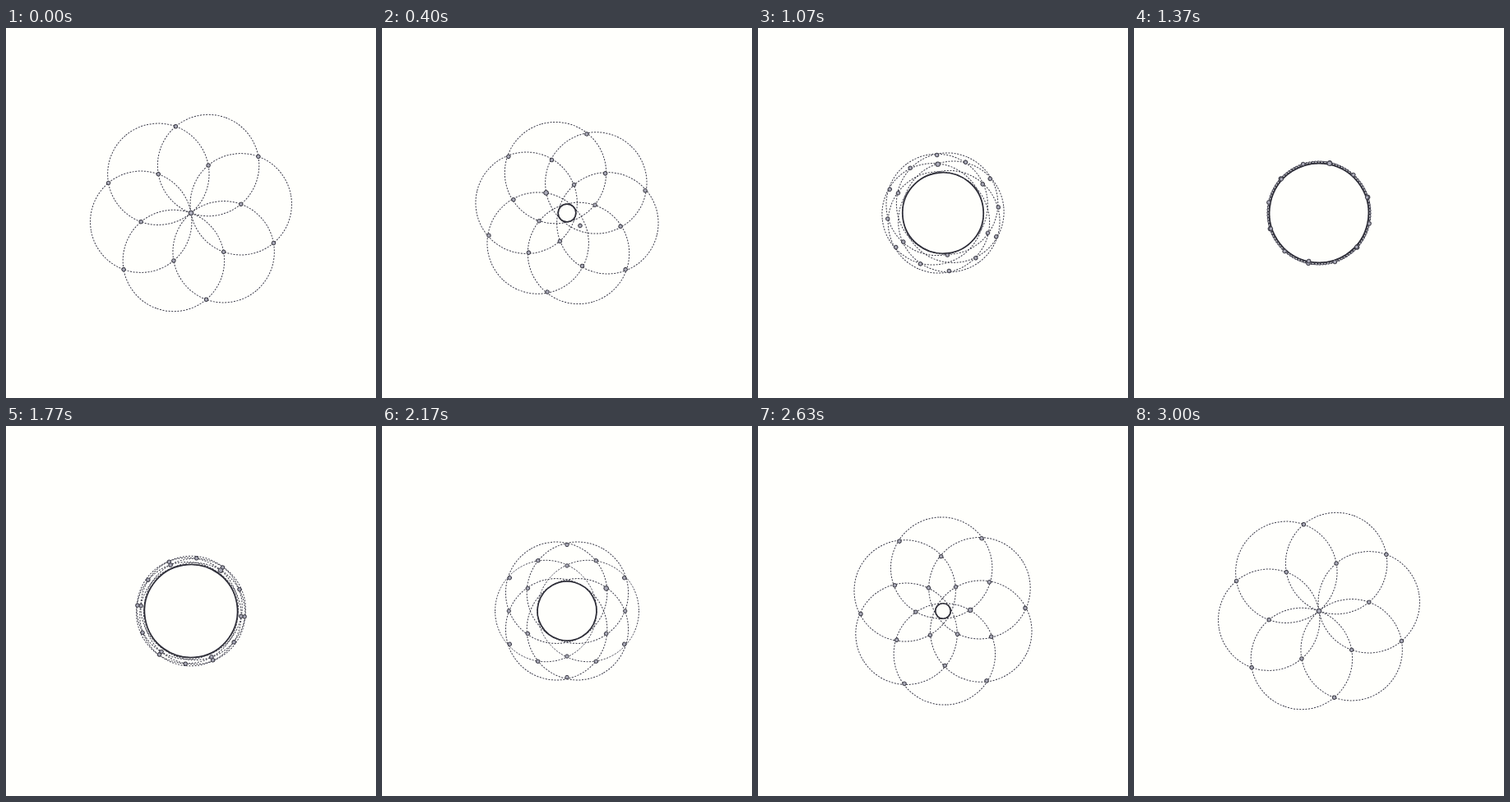
An HTML page for the animation above (3.03 s loop, 450 by 450 pixels).

```html
<!DOCTYPE html>
<html lang="en">
<head>
<meta charset="utf-8">
<title>Six circles</title>
<style>
  html, body { margin: 0; width: 100%; height: 100%; overflow: hidden; background: #fffffc; }
  svg { display: block; width: 100vw; height: 100vh; }
  .orbit { fill: none; stroke: #3c3c4a; stroke-width: 1; stroke-dasharray: 2 1.59; }
  .ring { fill: none; stroke: #2e2e38; stroke-width: 1.7; }
  .dot { fill: #aaaab8; stroke: #40404a; stroke-width: 1; }
</style>
</head>
<body>
<svg viewBox="0 0 450 450">
  <g id="stage"></g>
</svg>
<script>
  const R = 61.7;
  const LOOP = 3030, STEPS = 91;
  const stage = document.getElementById('stage');

  function circle(parent, cls, r) {
    const el = document.createElementNS('http://www.w3.org/2000/svg', 'circle');
    el.setAttribute('class', cls);
    el.setAttribute('r', r);
    parent.appendChild(el);
    return el;
  }

  function spoke(angle) {
    const g = document.createElementNS('http://www.w3.org/2000/svg', 'g');
    g.setAttribute('transform', `rotate(${angle})`);
    stage.appendChild(g);
    return g;
  }

  // Six copies of a circle, one on every 60 degree spoke
  function six(offset, cls, size) {
    return Array.from({ length: 6 }, (_, k) => circle(spoke(offset + k * 60), cls, size(k)));
  }

  const LEAD = 3, LAG = 0; // the larger inner dot and the late one opposite it
  const orbits = six(0, 'orbit', () => R);
  const ring = circle(stage, 'ring', 0);
  const outer = six(30, 'dot', () => 2.2);
  const middle = six(0, 'dot', () => 2.2);
  const inner = six(90, 'dot', k => k === LEAD ? 2.7 : 2.2);
  stage.appendChild(inner[LEAD].parentNode);

  const place = (list, x) => list.forEach(el => el.setAttribute('cx', x));
  const smooth = x => x * x * (3 - 2 * x);

  function draw(step) {
    const turn = step / (STEPS - 1);
    const away = Math.abs(1 - 2 * turn); // 1 when fully open, 0 when closed
    const open = smooth(away);
    const d = R * open;
    stage.setAttribute('transform', `translate(225 225) rotate(${-70 + 2 * step})`);
    place(orbits, d);
    ring.setAttribute('r', R - d);
    place(outer, R + (Math.sqrt(3) - 1) * d);
    place(middle, R + 0.6 * d * (1 - open));
    place(inner, R * (1 - away ** 2.75));
    if (turn < 0.5) place([inner[LAG]], R * (1 - away ** 1.44));
  }

  const start = performance.now();
  function tick() {
    const t = (performance.now() - start) % LOOP;
    draw(Math.min(STEPS - 1, Math.floor(t / LOOP * STEPS + 0.15)));
    requestAnimationFrame(tick);
  }
  tick();
</script>
</body>
</html>
```
